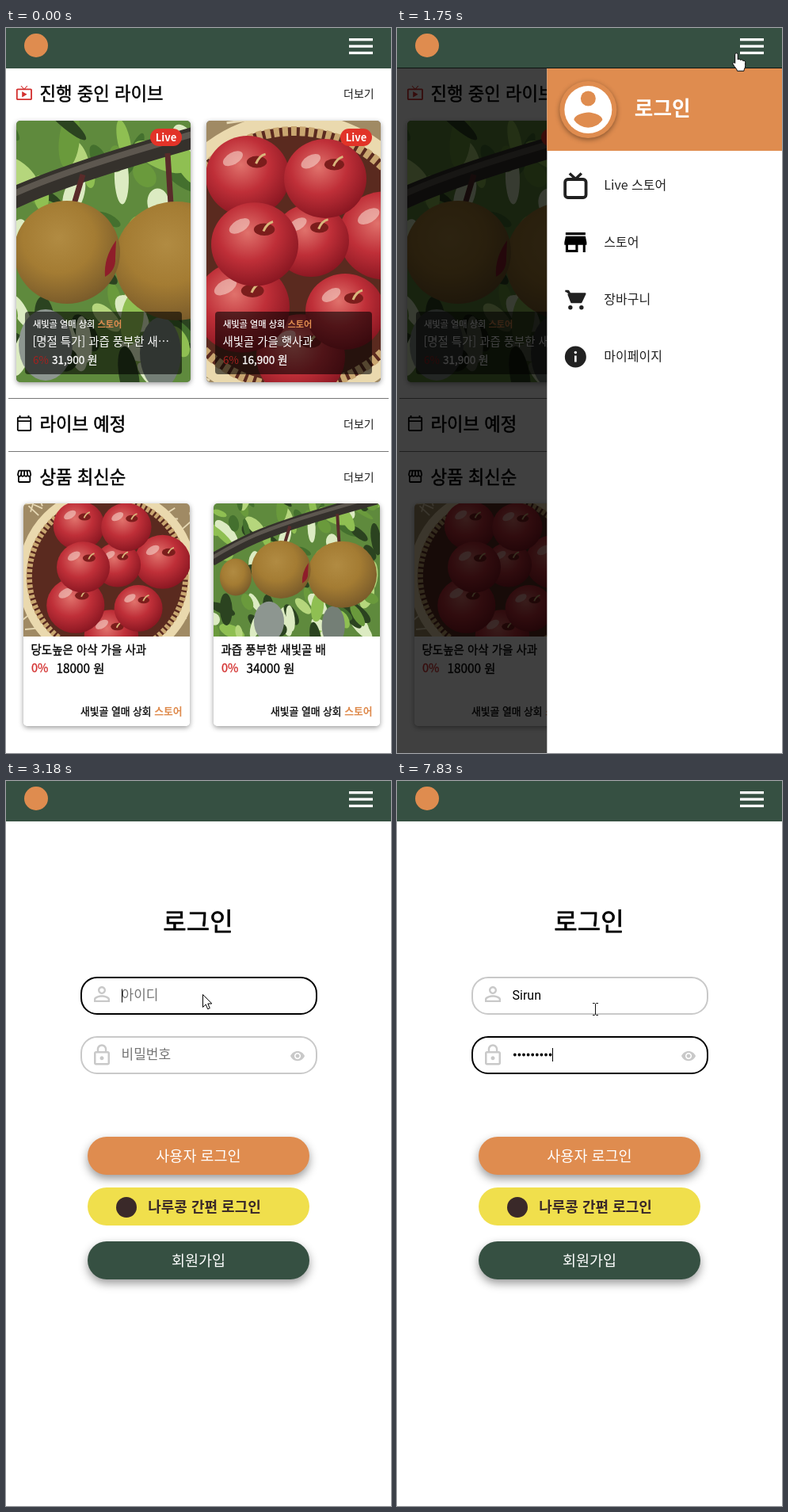
An HTML page that plays this animation: 486x915 px, repeating every 8000 ms.

```html
<!DOCTYPE html>
<html lang="ko">
<head>
<meta charset="utf-8">
<style>
  html, body { margin: 0; width: 100%; height: 100%; overflow: hidden; background: #fff; }
  svg { display: block; font-family: 'Noto Sans CJK KR', 'Noto Sans CJK', sans-serif; }
  .shadow { filter: drop-shadow(0 2px 3px rgba(0, 0, 0, .4)); }
  .lift { filter: drop-shadow(0 5px 6px rgba(0, 0, 0, .4)); }
</style>
</head>
<body>
<svg id="stage" width="486" height="915" viewBox="0 0 486 915"></svg>
<script>
const LOOP = 8000, GREEN = '#365042', ORANGE = '#df8c4f', RED = '#d3302f', GREY = '#c9c9c9', INK = '#212121';
const STORE = '새빛골 열매 상회', USER = 'Sirun';

let seed = 7;
const random = (min, max) => {
  seed = seed * 16807 % 2147483647;
  return +(min + (max - min) * seed / 2147483647).toFixed(1);
};
const pick = list => list[Math.floor(random(0, list.length - .1))];
const repeat = (n, fn) => Array.from({ length: n }, (_, i) => fn(i)).join('');

// Text is placed by its vertical centre; a hairline stroke gives the medium weight.
const text = (str, x, y, size, fill = '#000', weight = 400, anchor = 'start') =>
  `<text x="${x}" y="${y + size * .37}" font-size="${size}" fill="${fill}" font-weight="${weight}" text-anchor="${anchor}"
    ${weight === 500 ? `stroke="${fill}" stroke-width="${size * .022}"` : ''}>${str}</text>`;
const rect = (x, y, w, h, fill, rx = 0, extra = '') =>
  `<rect x="${x}" y="${y}" width="${w}" height="${h}" fill="${fill}" rx="${rx}" ${extra}/>`;
const circle = (x, y, r, fill, extra = '') => `<circle cx="${x}" cy="${y}" r="${r}" fill="${fill}" ${extra}/>`;
const ellipse = (x, y, rx, ry, fill, extra = '') =>
  `<ellipse cx="${x}" cy="${y}" rx="${rx}" ry="${ry}" fill="${fill}" ${extra}/>`;
const icon = (name, x, y, scale, fill) =>
  `<path d="${icons[name]}" transform="translate(${x} ${y}) scale(${scale})" fill="${fill}"/>`;
const gradient = (id, ...colors) =>
  `<radialGradient id="${id}" cx=".42" cy=".36" r=".68">${colors.map((c, i) =>
    `<stop offset="${i / (colors.length - 1)}" stop-color="${c}"/>`).join('')}</radialGradient>`;

const icons = {
  live: 'M21 6h-7.59l3.29-3.29L16 2l-4 4-4-4-.71.71L10.59 6H3c-1.1 0-2 .89-2 2v12c0 1.1.9 2 2 2h18c1.1 0 2-.9 2-2V8c0-1.11-.9-2-2-2zm0 14H3V8h18v12zM9 10v8l7-4z',
  calendar: 'M20 3h-1V1h-2v2H7V1H5v2H4c-1.1 0-2 .9-2 2v16c0 1.1.9 2 2 2h16c1.1 0 2-.9 2-2V5c0-1.1-.9-2-2-2zm0 18H4V10h16v11zm0-13H4V5h16v3z',
  shop: 'M21.9 8.89l-1.05-4.37c-.22-.9-1-1.52-1.91-1.52H5.05c-.9 0-1.69.63-1.9 1.52L2.1 8.89c-.24 1.02-.02 2.06.62 2.88.08.11.19.19.28.29V19c0 1.1.9 2 2 2h14c1.1 0 2-.9 2-2v-6.94c.09-.09.2-.18.28-.28.64-.82.87-1.87.62-2.89zm-2.99-3.9l1.05 4.37c.1.42.01.84-.25 1.17-.14.18-.44.47-.94.47-.61 0-1.14-.49-1.21-1.14L16.98 5l1.93-.01zM13 5h1.96l.54 4.52c.05.39-.07.78-.33 1.07-.22.26-.54.41-.95.41-.67 0-1.22-.59-1.22-1.31V5zM8.49 9.52L9.04 5H11v4.69c0 .72-.55 1.31-1.29 1.31-.34 0-.65-.15-.89-.41-.25-.29-.37-.68-.33-1.07zm-4.45-.16L5.05 5h1.97l-.58 4.86c-.08.65-.6 1.14-1.21 1.14-.49 0-.8-.29-.93-.47-.27-.32-.36-.75-.26-1.17zM5 19v-6.03c.08.01.15.03.23.03.87 0 1.66-.36 2.24-.95.6.6 1.4.95 2.31.95.87 0 1.65-.36 2.23-.93.59.57 1.39.93 2.29.93.84 0 1.64-.35 2.24-.95.58.59 1.37.95 2.24.95.08 0 .15-.02.23-.03V19H5z',
  store: 'M20 4H4v2h16V4zm1 10v-2l-1-5H4l-1 5v2h1v6h10v-6h4v6h2v-6h1zm-9 4H6v-4h6v4z',
  person: 'M12 5.9c1.16 0 2.1.94 2.1 2.1s-.94 2.1-2.1 2.1S9.9 9.16 9.9 8s.94-2.1 2.1-2.1m0 9c2.97 0 6.1 1.46 6.1 2.1v1.1H5.9V17c0-.64 3.13-2.1 6.1-2.1M12 4C9.79 4 8 5.79 8 8s1.79 4 4 4 4-1.79 4-4-1.79-4-4-4zm0 9c-2.67 0-8 1.34-8 4v3h16v-3c0-2.66-5.33-4-8-4z',
  lock: 'M12 17c1.1 0 2-.9 2-2s-.9-2-2-2-2 .9-2 2 .9 2 2 2zm6-9h-1V6c0-2.76-2.24-5-5-5S7 3.24 7 6v2H6c-1.1 0-2 .9-2 2v10c0 1.1.9 2 2 2h12c1.1 0 2-.9 2-2V10c0-1.1-.9-2-2-2zM8.9 6c0-1.71 1.39-3.1 3.1-3.1s3.1 1.39 3.1 3.1v2H8.9V6zM18 20H6V10h12v10z',
  eye: 'M12 4.5C7 4.5 2.73 7.61 1 12c1.73 4.39 6 7.5 11 7.5s9.27-3.11 11-7.5c-1.73-4.39-6-7.5-11-7.5zM12 17c-2.76 0-5-2.24-5-5s2.24-5 5-5 5 2.24 5 5-2.24 5-5 5zm0-8c-1.66 0-3 1.34-3 3s1.34 3 3 3 3-1.34 3-3-1.34-3-3-3z'
};

const leaf = () => {
  const x = random(-75, 300), y = random(110, 450);
  const fill = pick(['#8fbf52', '#6a9a3c', '#44702e', '#b5d67c', '#2b4320', '#dcebc2']);
  return ellipse(x, y, random(14, 38), random(6, 15), fill, `transform="rotate(${random(20, 120)} ${x} ${y})"`);
};
const pears = () => `<g id="pears">
  ${rect(-80, 110, 390, 345, '#5f8a3d')}${repeat(110, leaf)}
  ${ellipse(50, 400, 34, 45, '#8d9690')}${ellipse(195, 410, 26, 45, '#747f76')}
  <path d="M-80 262C0 215 40 200 100 180S230 140 310 118" fill="none" stroke="#35312c" stroke-width="27"/>
  <path d="M-80 257C0 210 40 195 100 175S230 135 310 113" fill="none" stroke="#5d574f" stroke-width="8"/>
  <path d="M97 185L86 222M204 158L208 222" stroke="#592b2a" stroke-width="7"/>
  ${ellipse(-25, 300, 36, 42, 'url(#pear)')}${ellipse(215, 294, 78, 75, 'url(#pear)')}
  ${ellipse(77, 283, 67, 65, 'url(#pear)')}<path d="M139 268q-16 22-14 46q14-8 13-24z" fill="#8f1d2a"/></g>`;

const straw = () => `M${random(180, 545)} ${random(105, 460)}l${random(-40, 40)} ${random(-22, 22)}`;
const apple = ([x, y, r]) => ellipse(x, y, r, r * .96, 'url(#apple)') +
  ellipse(x - r * .35, y - r * .42, r * .26, r * .14, '#f7d3c9', `opacity=".6" transform="rotate(-30 ${x - r * .35} ${y - r * .42})"`) +
  ellipse(x + r * .22, y - r * .34, r * .24, r * .14, '#7c1d1c') +
  `<path d="M${x + r * .2} ${y - r * .3}q4-10 12-12" fill="none" stroke="#d9b77c" stroke-width="3"/>`;
const apples = () => `<g id="apples">
  ${rect(180, 105, 370, 355, '#a08a64')}
  <path d="${repeat(140, straw)}" stroke="#e6d8b4" stroke-width="3"/>
  ${circle(364, 292, 176, '#5a2a1f', 'stroke="#ead9ae" stroke-width="18"')}
  ${circle(364, 292, 162, 'none', 'stroke="#c9a670" stroke-width="12" stroke-dasharray="7 4"')}
  ${[[372, 415, 56], [478, 262, 58], [298, 352, 60], [385, 268, 48], [305, 187, 53], [403, 190, 52], [428, 358, 50], [314, 273, 55]].map(apple).join('')}</g>`;

const photo = (name, x, y, w, h, transform = '') =>
  `<clipPath id="clip${x}">${rect(x, y, w, h, '#000', 5)}</clipPath>
   <g clip-path="url(#clip${x})"><use href="#${name}" transform="${transform}"/></g>`;
const storeLine = (x, y, size, anchor, fill) =>
  text(`${STORE} <tspan fill="${ORANGE}" stroke="none" font-weight="700">스토어</tspan>`, x, y, size, fill, 500, anchor);

const liveCard = (x, name, title, price) =>
  rect(x, 117, 220, 330, '#777', 5, 'class="shadow"') + photo(name, x, 117, 220, 330) +
  rect(x + 169, 127, 40, 22, '#e23328', 11) + text('Live', x + 189, 138, 13, '#fff', 700, 'middle') +
  rect(x + 11, 358, 198, 79, 'rgba(0,0,0,.58)', 4) + storeLine(x + 21, 374, 11.2, 'start', '#fff') +
  text(title, x + 20.5, 395.5, 14.4, '#fff') + text('6%', x + 21, 419, 13.4, '#a5211f') + text(price, x + 45, 419, 13.5, '#fff', 500);

const productCard = (x, name, transform, title, price) =>
  rect(x, 600, 210, 281, '#fff', 5, 'class="shadow"') + photo(name, x, 600, 210, 281, transform) +
  rect(x, 768, 210, 113, '#fff', 5) + rect(x, 768, 210, 20, '#fff') +
  text(title, x + 9.5, 785, 14.5, '#000', 500) + text('0%', x + 10, 808, 14.5, RED, 500) +
  text(price, x + 41.5, 808, 15.3, '#000', 500) + storeLine(x + 200.5, 862, 12.8, 'end', '#000');

const heading = (str, y) => text(str, 42.5, y, 22.3, '#000', 500) + text('더보기', 426, y, 14, INK, 300);

const home = () => `<g id="home">
  ${heading('진행 중인 라이브', 82.5)}${heading('라이브 예정', 499.5)}${heading('상품 최신순', 566.5)}
  ${icon('live', 12, 71, .91, RED)}${icon('calendar', 12.1, 488, .91, '#000')}${icon('shop', 12.3, 555, .9, '#000')}
  ${rect(3, 467, 480, 1, '#777')}${rect(3, 534, 480, 1, '#777')}
  ${liveCard(13, 'pears', '[명절 특가] 과즙 풍부한 새⋯', '31,900 원')}
  ${liveCard(253, 'apples', '새빛골 가을 햇사과', '16,900 원')}
  ${productCard(22, 'apples', 'translate(-94 514) scale(.61)', '당도높은 아삭 가을 사과', '18000 원')}
  ${productCard(262, 'pears', 'translate(304 525) scale(.56)', '과즙 풍부한 새빛골 배', '34000 원')}
  ${rect(0, 50, 486, 1, GREEN)}${rect(0, 50, 486, 865, '#000', 0, 'id="backdrop"')}</g>`;

const field = (id, y) => rect(95, y, 297, 46, '#fff', 20, `id="${id}Box" stroke-width="2"`);
const button = (y, fill, label, cls, x = 243, color = '#fff', weight = 400, size = 18.5) =>
  rect(103, y, 280, 48, fill, 24, `class="${cls}"`) + text(label, x, y + 24, size, color, weight, 'middle');

const login = () => `<g id="login">${rect(0, 50, 486, 865, '#fff')}${rect(0, 50, 486, 1, GREEN)}
  ${text('로그인', 242.5, 177, 32, '#000', 500, 'middle')}
  ${field('user', 248)}${field('pass', 323)}
  ${icon('person', 106, 254, 1.25, GREY)}${icon('lock', 106, 331, 1.25, GREY)}${icon('eye', 358.2, 337.2, .82, GREY)}
  <g id="userHint">${text('아이디', 145.5, 270, 17, '#757575')}</g>
  <g id="passHint">${text('비밀번호', 145.5, 345, 17, '#757575')}</g>
  <text id="userText" x="145.5" y="276" font-size="16" font-family="Roboto, sans-serif"></text>
  <path id="dots" stroke="#000" stroke-width="3.8" stroke-linecap="round" stroke-dasharray="0 5.6"/>
  ${rect(0, 0, 1, 17, '#000', 0, 'id="caret"')}
  ${button(449, ORANGE, '사용자 로그인', 'lift')}
  ${button(513, '#f0df4c', '나루콩 간편 로그인', '', 250.5, '#3a2929', 700, 18)}${circle(152, 538, 13, '#3a2929')}
  ${button(581, GREEN, '회원가입', 'lift')}</g>`;

const drawer = () => `<g id="drawer">${rect(0, 51, 336, 864, '#fff')}${rect(0, 51, 336, 104, ORANGE)}
  ${circle(52, 103, 36, ORANGE, 'class="shadow"')}${circle(52, 103, 30, '#fff')}${circle(52, 89, 9.5, ORANGE)}
  <path d="M34 116c0-6 12-9.5 18-9.5s18 3.5 18 9.5a21.6 21.6 0 0 1-36 0z" fill="${ORANGE}"/>
  ${text('로그인', 110.5, 102, 25.6, '#fff', 700)}
  ${['Live 스토어', '스토어', '장바구니', '마이페이지'].map((s, i) => text(s, 72, 198 + 72 * i, 16, INK, 300)).join('')}
  ${rect(22.8, 191, 26.4, 23, 'none', 3.5, `stroke="${INK}" stroke-width="3.8"`)}
  <path d="M28.5 183.500l7.500 7 7.500-7" fill="none" stroke="${INK}" stroke-width="3.4"/>
  ${icon('store', 17.3, 251.8, 1.56, '#000')}
  <path d="M23 332h4l2 3.500h19l-5 10.500h-12l-4-10.500" fill="${INK}" stroke="${INK}" stroke-width="2.4" stroke-linejoin="round"/>
  ${circle(29.5, 352.8, 2.7, INK)}${circle(43.5, 352.8, 2.7, INK)}
  ${circle(36, 415, 13.5, INK)}${rect(34.7, 413.5, 2.6, 8, '#fff')}${circle(36, 409.5, 1.7, '#fff')}</g>`;

const header = () => rect(0, 0, 486, 50, GREEN) + circle(38, 22, 15, ORANGE) +
  repeat(3, i => rect(433, 13 + 8.4 * i, 30, 3.3, '#fff'));

const cursor = () => `<g id="cursor">
  ${circle(0, 1, 12, 'rgba(255,230,0,.62)', 'id="press"')}
  <path id="arrow" d="M.5.5v16l3.700-3.500 2.500 5.800 2.600-1.100-2.500-5.700h5z" fill="#fff" stroke="#000"/>
  <path id="hand" d="M-1.500 3c0-2.600 3.500-2.600 3.500 0v6c1.200-1 3-.6 3.300.7 1.300-.9 3-.3 3.200 1 1.400-.7 3 .2 3 2v4c0 3-1.500 4-1.800 6.800h-8.400c-.6-3-3.500-5-5.300-8.300-1-2 1-3.200 2.500-1.500z" fill="#fff" stroke="#000"/>
  <path id="beam" d="M-3-7.500h2.500l1 1 1-1h2.500M-3 7.500h2.500l1-1 1 1h2.500M.5-6.500v13" fill="none" stroke="#111"/></g>`;

document.getElementById('stage').innerHTML =
  `<defs>${gradient('pear', '#b18b42', '#a47c33', '#77592a')}${gradient('apple', '#e0726c', '#bf2f38', '#861520')}${pears()}${apples()}</defs>` +
  home() + login() + drawer() + header() + cursor();

const el = Object.fromEntries([...document.querySelectorAll('#stage [id]')].map(e => [e.id, e]));
const show = (id, on) => { el[id].style.display = on ? '' : 'none'; };
const within = (t, a, b) => t >= a && t < b;
const ease = (t, start, length) => {
  const u = Math.min(1, Math.max(0, (t - start) / length));
  return u * u * (3 - 2 * u);
};
const countBefore = (times, t) => times.filter(k => k <= t).length;

const path = [[70, 368, 935], [750, 451, 18], [1620, 451, 18], [2160, 297, 104], [2440, 297, 104], [2560, 296, 113], [2980, 248, 269]];
const userKeys = [4310, 4640, 4770, 4900, 5030];
const passKeys = [6090, 6360, 6420, 6620, 6820, 7280, 7700, 7700, 7830];

function pointer(t) {
  const i = Math.max(0, countBefore(path.map(p => p[0]), t) - 1);
  const [t0, x0, y0] = path[i], [t1, x1, y1] = path[i + 1] || path[i];
  const k = ease(t, t0, t1 - t0 || 1);
  return [x0 + (x1 - x0) * k, y0 + (y1 - y0) * k];
}

function render(t) {
  const loggingIn = t >= 2440, onPass = t >= 5560, beam = t >= 3390;
  show('home', !loggingIn);
  show('login', loggingIn);
  el.backdrop.setAttribute('opacity', .75 * Math.min(1, Math.max(0, (t - 1500) / 100)));
  const shown = ease(t, 1515, 300) - ease(t, 2440, 240);
  el.drawer.setAttribute('transform', `translate(${486 - 336 * shown})`);
  show('drawer', shown > 0);

  const typed = countBefore(userKeys, t), dots = countBefore(passKeys, t);
  el.userText.textContent = USER.slice(0, typed);
  show('userHint', !typed);
  show('passHint', !dots);
  show('dots', dots);
  el.dots.setAttribute('d', `M148.8 345.5h${5.6 * (dots - 1) + .1}`);
  el.userBox.setAttribute('stroke', t >= 3050 && !onPass ? '#000' : GREY);
  el.passBox.setAttribute('stroke', onPass ? '#000' : GREY);

  const caretX = onPass ? 146 + 5.6 * dots : 146 + (typed && el.userText.getComputedTextLength());
  el.caret.setAttribute('x', Math.round(caretX));
  el.caret.setAttribute('y', onPass ? 337 : 262.5);
  show('caret', t >= 3050 && !within(t, 3570, 4110));

  const [x, y] = beam ? [250, 288] : pointer(t), overMenu = y < 40 && x > 425;
  el.cursor.setAttribute('transform', `translate(${x} ${y})`);
  show('beam', beam);
  show('hand', !beam && overMenu);
  show('arrow', !beam && !overMenu);
  show('press', within(t, 1420, 1550) || within(t, 2230, 2440) || within(t, 3050, 3180));
}

const start = performance.now();
(function tick() {
  render((performance.now() - start) % LOOP);
  requestAnimationFrame(tick);
})();
</script>
</body>
</html>
```
